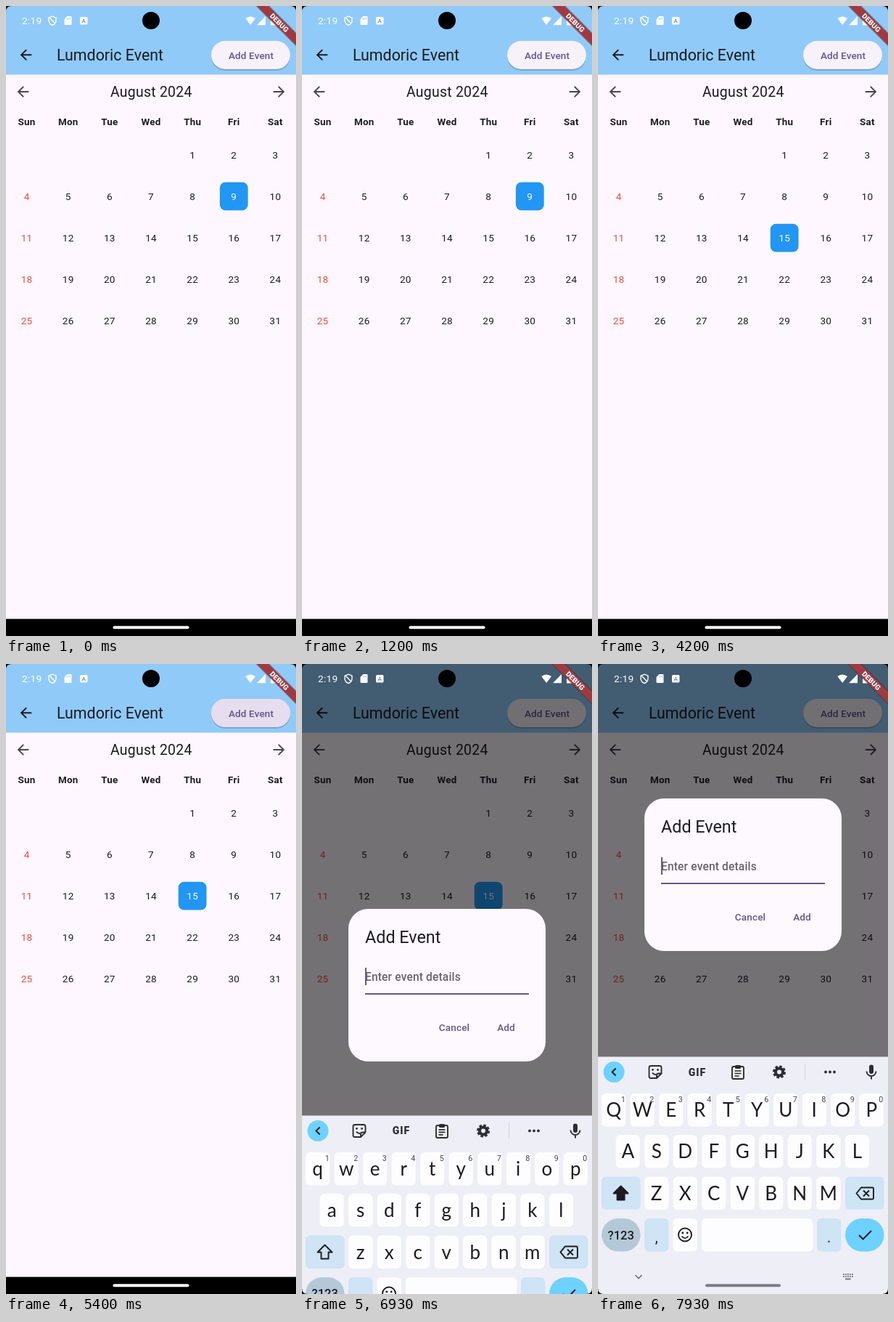
Write an HTML page that moves like this. It is 400 px wide and 867 px high and loops after 8000 ms.

```html
<!DOCTYPE html>
<html lang="en">
<head>
<meta charset="utf-8">
<style>
  html, body { margin: 0; width: 100%; height: 100%; overflow: hidden; background: #000; }
  svg { display: block; font-family: Roboto, sans-serif; }
  #lower, #upper { font-family: Lato, sans-serif; }
</style>
</head>
<body>
<svg id="stage" width="400" height="867" viewBox="0 0 400 867"></svg>
<script>
const LOOP = 8000;
const INK = '#1d1b20', PURPLE = '#65558f', PAPER = '#fef7ff', GREY = '#49454f', BAR = '#90caf9', RED = '#f04a40';
const KEY = '#fdfdff', SOFT_KEY = '#cfe4f5', CYAN = '#6dd2ff', FAINT = '#6b6c74';

const rect = (x, y, w, h, r, fill, extra = '') =>
  `<rect x="${x}" y="${y}" width="${w}" height="${h}" rx="${r}" fill="${fill}" ${extra}/>`;
const circle = (x, y, r, fill, extra = '') =>
  `<circle cx="${x}" cy="${y}" r="${r}" fill="${fill}" ${extra}/>`;
const text = (x, y, str, size, fill = INK, extra = '') =>
  `<text x="${x}" y="${y}" font-size="${size}" fill="${fill}" ${extra}>${str}</text>`;
const line = (d, color, width = 2, extra = '') =>
  `<path d="${d}" fill="none" stroke="${color}" stroke-width="${width}" ${extra}/>`;
const shape = (d, fill) => `<path d="${d}" fill="${fill}"/>`;
const group = (id, content) => `<g id="${id}">${content}</g>`;
const at = (x, y, content) => `<g transform="translate(${x} ${y})">${content}</g>`;

const MID = 'text-anchor="middle"';
const MEDIUM = 'font-weight="500" letter-spacing=".1"';
const BODY = 'letter-spacing=".25"';

const arrow = (x, y, color, flip = 1) =>
  `<path transform="translate(${x} ${y}) scale(${.973 * flip} .973) translate(-12 -12)" fill="${color}"
    d="M20 11H7.83l5.59-5.59L12 4l-8 8 8 8 1.41-1.41L7.83 13H20z"/>`;

const column = i => 28.6 + 57.14 * i;
const cellOf = day => [column((day + 3) % 7), 204.8 + 57.14 * Math.floor((day + 3) / 7)];

function dayLabel(day, fill) {
  const [x, y] = cellOf(day);
  return text(x, y + 4.9, day, 13.6, fill, `${MID} ${BODY}`);
}

function selection(day) {
  const [x, y] = cellOf(day);
  return group('pick' + day, rect(x - 19.4, y - 19.4, 38.8, 38.8, 7.8, '#2196f3') + dayLabel(day, '#fafafa'));
}

function calendar() {
  const names = ['Sun', 'Mon', 'Tue', 'Wed', 'Thu', 'Fri', 'Sat'];
  let out = text(200.3, 124.8, 'August 2024', 19.45, INK, `${MID} ${BODY}`)
    + arrow(23.5, 118, GREY) + arrow(376.5, 118, GREY, -1);
  names.forEach((n, i) => out += text(column(i), 163.9, n, 13.4, INK, `${MID} font-weight="700" ${BODY}`));
  for (let d = 1; d <= 31; d++) out += dayLabel(d, d % 7 === 4 ? RED : INK);
  return out + selection(9) + selection(15);
}

function appBar() {
  const pill = (fill, extra) => rect(283, 48, 109, 39, 19.5, fill, extra);
  return rect(0, 0, 400, 94.5, 0, BAR)
    + arrow(27.5, 67.3, INK)
    + text(70, 74.6, 'Lumdoric Event', 21.4)
    + pill('#000', 'opacity=".12" transform="translate(0 2)"')
    + pill('#000', 'opacity=".14" transform="translate(0 1)"')
    + pill('#f7f2fa')
    + `<clipPath id="pill">${pill('#000')}</clipPath>`
    + `<g clip-path="url(#pill)">${circle(335, 68, 0, '#ddd3ea', 'id="ripple"')}</g>`
    + text(338, 72.5, 'Add Event', 13.6, PURPLE, `${MID} ${MEDIUM}`);
}

function statusBar() {
  const W = '#fff';
  return text(22, 25, '2:19', 13.6, W, 'letter-spacing=".3"')
    + line('M64 14.2l5 2v4c0 3-2 5-5 6.300c-3-1.300-5-3.300-5-6.300v-4zM60.500 16.500l7.500 8', W, 1.4)
    + shape('M84.500 14h5q1 0 1 1v10q0 1-1 1h-8q-1 0-1-1v-7z', W)
    + line('M84.500 16v2.500M86.500 16v2.500M88.500 16v2.500', BAR, .9)
    + rect(102, 15, 10.5, 10.5, 1.5, W)
    + text(107.2, 23.3, 'A', 8, '#6f9cc4', `${MID} font-weight="700"`)
    + circle(200, 20, 12, '#000')
    + shape('M330.300 17q6.700-5 13.700 0l-6.850 9z', W)
    + shape('M346 26.300L358 14v12.300z', W)
    + shape('M365 15.500h2.500v-1.500h3v1.500h2.500v11h-8z', W);
}

function banner() {
  return `<g transform="translate(400 0) rotate(45)">`
    + rect(-50, 25.5, 100, 13.8, 0, '#000', 'opacity=".25"')
    + rect(-50, 26.7, 100, 11.7, 0, '#a03a40')
    + text(0, 36.1, 'DEBUG', 9.9, '#fff', `${MID} font-weight="900"`) + '</g>';
}

function dialog() {
  return rect(64, 0, 272, 210, 27, '#fdf9ff')
    + text(87, 47, 'Add Event', 23.35)
    + text(87, 98.6, 'Enter event details', 15.57, '#68626c', 'font-weight="500" letter-spacing=".15"')
    + rect(87, 116, 226, 2, 0, PURPLE, 'id="underline"')
    + rect(87, 81, 2, 24, 0, PURPLE, 'id="cursor"')
    + text(210, 168.4, 'Cancel', 13.6, PURPLE, `${MID} ${MEDIUM}`)
    + text(281.5, 168.4, 'Add', 13.6, PURPLE, `${MID} ${MEDIUM}`);
}

function toolbar() {
  const C = '#2c2d33';
  return circle(22, 561.5, 14.5, CYAN) + line('M24.500 556.500l-5 5 5 5', INK)
    + at(79, 561.5, line('M8.500 2v-8q0-2.500-2.500-2.500h-12q-2.500 0-2.500 2.500v12q0 2.500 2.500 2.500h8zM8.500 2h-4q-2.500 0-2.500 2.500v4M-4 1q2 3 5 2.500', C, 1.9)
      + circle(-3.5, -3, 1.4, C) + circle(3.5, -3, 1.4, C))
    + text(137, 566.5, 'GIF', 14, C, `${MID} font-weight="900" letter-spacing="1"`)
    + at(193, 562, rect(-8, -8, 16, 17, 2, 'none', `stroke="${C}" stroke-width="1.9"`)
      + rect(-4, -10, 8, 5, 1.5, C) + line('M-4.500-2h9M-4.500 1.500h9M-4.500 5h6', C, 1.7))
    + at(250, 561.5, circle(0, 0, 5, 'none', `stroke="${C}" stroke-width="4"`)
      + circle(0, 0, 7.5, 'none', `stroke="${C}" stroke-width="3" stroke-dasharray="3.500 2.390"`))
    + rect(285, 551, 1, 21, 0, '#d0d1da')
    + [314, 320, 326].map(x => circle(x, 561.5, 1.9, C)).join('')
    + at(377, 561.5, rect(-3, -10, 6, 12.5, 3, C) + line('M-6.500-1a6.500 6.500 0 0 0 13 0M0 5.500v4.500', C, 1.9));
}

const rows = [['qwertyuiop', 21.6, 622.8, 591], ['asdfghjkl', 41.2, 680.3, 648], ['zxcvbnm', 80.7, 737.6, 705.5]];
const eachKey = make => rows.map(([chars, x, base, top]) =>
  [...chars].map((c, i) => make(c, x + 39.52 * i, base, top)).join('')).join('');

function keyboard() {
  const letters = eachKey((c, x, base) => text(x, base, c, 26, INK, MID));
  const capitals = eachKey((c, x, base) => text(x, base, c.toUpperCase(), 26, INK, MID));
  const wide = (x, y, r, fill) => rect(x, y, 53.5, 45.5, r, fill);
  const narrow = (x, fill) => rect(x, 763, 33.3, 45.5, 6, fill);
  const shift = fill => `<path d="M31.500 718.500l10 10h-5v9h-10v-9h-5z" fill="${fill}" stroke="${INK}" stroke-width="1.900" stroke-linejoin="round"/>`;
  let digits = '', dots = '';
  for (let i = 0; i < 10; i++) {
    digits += text(34.7 + 39.52 * i, 603.3, (i + 1) % 10, 10.8, '#45464e', MID);
    dots += rect(338 + i % 5 * 3, 839 + (i / 5 | 0) * 3, 1.8, 1.8, 0, FAINT);
  }

  return rect(0, 540.5, 400, 330, 0, '#eeeef6') + toolbar()
    + eachKey((c, x, base, top) => rect(x - 16.6, top, 33.2, 45.5, 6, KEY))
    + digits
    + wide(5, 705.5, 6, SOFT_KEY) + wide(341, 705.5, 6, SOFT_KEY)
    + line('M363 720.500h15.500q1.500 0 1.500 1.500v13q0 1.500-1.500 1.500h-15.500l-6.500-8zM366 724.500l8 8M374 724.500l-8 8', INK, 1.9, 'stroke-linejoin="round"')
    + group('lower', letters + shift('none')) + group('upper', capitals + shift(INK))
    + wide(5, 763, 22.7, '#b4c9d8') + text(31.7, 791.5, '?123', 16.5, INK, `${MID} font-weight="500"`)
    + narrow(64, SOFT_KEY) + text(80.6, 796, ',', 20, INK, MID)
    + narrow(103.5, KEY)
    + at(120, 785.5, circle(0, 0, 9, 'none', `stroke="${INK}" stroke-width="1.900"`) + circle(-3.2, -2.5, 1.4, INK)
      + circle(3.2, -2.5, 1.4, INK) + line('M-4.500 2q4.500 5.500 9 0', INK, 1.7))
    + rect(143, 763, 153, 45.5, 6, KEY)
    + narrow(302, SOFT_KEY) + text(318.6, 796, '.', 20, INK, MID)
    + wide(341, 763, 22.7, CYAN) + line('M360 786l5.500 5.500L377 780', INK)
    + line('M51.500 841l4.500 4.500 4.500-4.500', FAINT, 1.6)
    + dots + rect(341, 845.5, 7.5, 1.8, 0, FAINT)
    + rect(148, 853.3, 104, 4, 2, '#7c7c82');
}

stage.innerHTML =
  rect(0, 0, 400, 867, 0, PAPER) + calendar() + appBar()
  + rect(0, 0, 400, 867, 0, '#000', 'id="dim"')
  + rect(0, 843.5, 400, 24, 0, '#000') + rect(147.5, 853.3, 105, 4, 2, '#fff')
  + group('dialog', dialog()) + group('keyboard', keyboard())
  + statusBar() + banner()
  + '<path d="M0 0h400v867H0zM8 0Q0 0 0 8V859Q0 867 8 867H392Q400 867 400 859V8Q400 0 392 0z" fill-rule="evenodd"/>';

const el = id => document.getElementById(id);
const set = (id, name, value) => el(id).setAttribute(name, value);
const ramp = (t, start, length) => Math.min(1, Math.max(0, (t - start) / length));
const easeOut = p => 1 - (1 - p) ** 3;

const PICK = 3200, PRESS = 5330, OPEN = 5520, FOCUS = 6700;

function draw(t) {
  if (t > 6930 && t < 7060) t = 6930; // the keyboard stalls briefly on its way up

  const picked = ramp(t, PICK, 200);
  set('pick9', 'opacity', 1 - picked);
  set('pick15', 'opacity', picked);

  set('ripple', 'r', 30 + 60 * ramp(t, PRESS, 150));
  set('ripple', 'opacity', .65 * ramp(t, PRESS, 50) * (1 - ramp(t, OPEN, 200)));

  const opened = ramp(t, OPEN, 150);
  set('dim', 'opacity', .54 * opened);
  set('dialog', 'opacity', opened);
  set('dialog', 'transform', `translate(0 ${337 - 152 * easeOut(ramp(t, 7000, 260))})`);

  const focused = t >= FOCUS;
  set('underline', 'height', focused ? 2 : 1);
  set('cursor', 'opacity', focused && (t - FOCUS) % 1000 < 500 ? 1 : 0);

  set('keyboard', 'transform', `translate(0 ${326 * (1 - easeOut(ramp(t, 6800, 350)))})`);
  set('keyboard', 'visibility', t > 6800 ? 'visible' : 'hidden');
  const caps = t >= 7060;
  set('lower', 'display', caps ? 'none' : 'inline');
  set('upper', 'display', caps ? 'inline' : 'none');
}

const start = performance.now();
function tick() {
  draw((performance.now() - start) % LOOP);
  requestAnimationFrame(tick);
}
tick();
</script>
</body>
</html>
```
